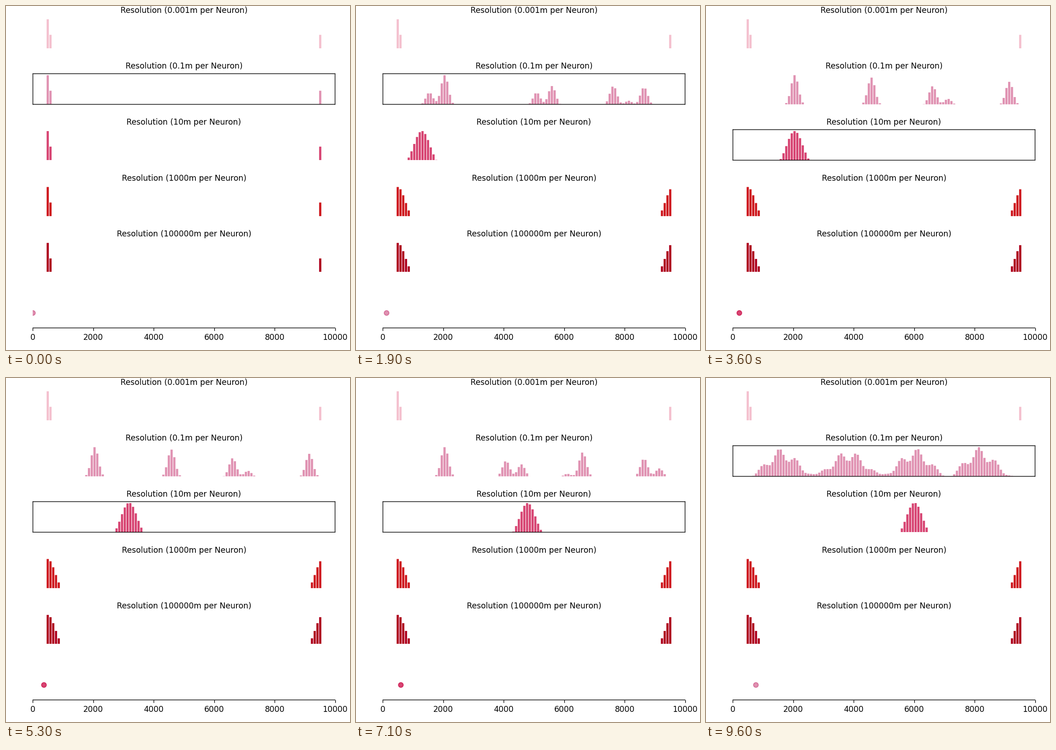
These frames come from a looping animation (748x748 px, 9.7 s). A matplotlib script:

```python
import matplotlib.pyplot as plt
import numpy as np
from matplotlib.animation import FuncAnimation

SIZE, DPI = 748, 125
FRAMES, INTERVAL = 97, 100
STEPS = FRAMES - 1
CELLS = np.arange(100)

# Layout in pixels, measured from the top left
LEFT, RIGHT, LAST_BASE = 58.5, 715.5, 700
ROW_PITCH, ROW_HEIGHT = 121.55, 66.5

SCALES = ["0.001", "0.1", "10", "1000", "100000"]
COLORS = np.array([(244, 192, 206), (224, 146, 178), (215, 68, 114),
                   (206, 24, 30), (174, 0, 30)]) / 255
FINE, MIDDLE = 1, 2
DOT_ALPHA = {FINE: 0.5, MIDDLE: 0.75}

# The selection flips between the 0.1 m and the 10 m network at these steps
SWITCHES = [6, 14, 22, 31, 34, 54, 58, 73, 78, 84, 88, 93]

# Cruise, speed up, sprint, slow down
STEP_KEYS = [0, 35, 52, 70, 95]
DISTANCE_KEYS = [0, 210, 364, 581, 746]
CELLS_PER_METRE = 0.0812

# Copies of the bump in the fine network sit on a regular lattice of cells
SLOTS = np.arange(-2, 16)
SLOT_CELLS = 11.5 + 5.57 * SLOTS


def normalise(values):
    return values / values.max()


def ring_bump(center, spread):
    """Thresholded bell on the ring of cells."""
    gap = np.abs(CELLS - center)
    gap = np.minimum(gap, 100 - gap)
    return normalise(np.maximum(np.exp(-gap ** 2 / spread) - 0.2, 0))


def copies(centers, width=1, fade=0.97):
    """Each center (in slots) feeds the lattice slots that lie near it."""
    weights = sum(fade ** k * np.maximum(1 - np.abs(SLOTS - c) / width, 0)
                  for k, c in enumerate(centers))
    gaps = CELLS[:, None] - SLOT_CELLS
    bells = np.exp(-gaps ** 2 / (3.6 * width))
    return normalise(np.maximum(bells @ weights - 0.03, 0))


def settle(step, values):
    """Ease from the initial pose into the settled activity."""
    amount = min(step / 4, 1)
    return (1 - amount) * START + amount * values


START = np.zeros(100)
START[[0, 1, -1]] = 1, 0.467, 0.467

steps = np.arange(STEPS)
flips = np.searchsorted(SWITCHES, steps, side="right")
active = np.where(flips % 2, MIDDLE, FINE)
distances = np.interp(steps, STEP_KEYS, DISTANCE_KEYS)

# The fine network only advances while it is selected
progress = np.cumsum(active == FINE) - 1
FINE_KEYS = progress[[0, 18, 33, 57, 77, 95]]
FINE_STATES = [
    START,
    copies([0.7, 7.6, 12.2, 14], fade=0.75),
    copies([1, 6, 10.25, 15], fade=0.92),
    copies(1 + 4.44 * np.arange(4)),
    copies(0.65 + 4.45 * np.arange(4), fade=1),
    copies(0.2 + 4.3 * np.arange(4), width=2, fade=1),
]


def fine_activity(step):
    where = np.interp(progress[step], FINE_KEYS, range(len(FINE_KEYS)))
    low = min(int(where), len(FINE_STATES) - 2)
    part = where - low
    return normalise((1 - part) * FINE_STATES[low] + part * FINE_STATES[low + 1])


def middle_activity(step):
    bump = ring_bump(distances[step] * CELLS_PER_METRE, 17.5)
    return normalise(settle(step, bump))


def add_row(index):
    base = LAST_BASE - (5 - index) * ROW_PITCH
    box = np.array([LEFT, SIZE - base, RIGHT - LEFT, ROW_HEIGHT]) / SIZE
    ax = fig.add_axes(box, facecolor="none")
    ax.set_yticks([])
    for spine in ax.spines.values():
        spine.set_snap(False)
    return ax


def show_frame(ax, visible):
    for spine in ax.spines.values():
        spine.set_visible(visible)


plt.rcParams.update({"font.family": "DejaVu Sans", "font.size": 9.9})
fig = plt.figure(figsize=(SIZE / DPI, SIZE / DPI), dpi=DPI, facecolor="white")

rows, bars = [], []
for i, scale in enumerate(SCALES):
    ax = add_row(i)
    ax.set_title(f"Resolution ({scale}m per Neuron)", fontsize=9.9, pad=6.25)
    ax.set_xticks([])
    bars.append(ax.bar(CELLS, START, color=COLORS[i], snap=False))
    ax.set_xlim(-5.39, 104.39)
    ax.set_ylim(0, 1.05)
    rows.append(ax)

track = add_row(5)
track.set_xlim(0, 10000)
track.set_ylim(-1, 1)
track.set_xticks(range(0, 10001, 2000))
show_frame(track, False)
track.spines["bottom"].set_visible(True)
dot = track.scatter([0], [0], s=36, linewidths=1, snap=False)


def paint_dot(row):
    """Translucent fill and edge overlap into a darker ring."""
    alpha = DOT_ALPHA[row]
    base = np.clip((COLORS[row] - (1 - alpha)) / alpha, 0, 1)
    rgba = [(*base, alpha)]
    dot.set_facecolor(rgba)
    dot.set_edgecolor(rgba)


def update(frame):
    step = max(frame - 1, 0)
    coarse = settle(step, ring_bump(0, 15.5))
    levels = [START, fine_activity(step), middle_activity(step), coarse, coarse]
    for i, (ax, group, values) in enumerate(zip(rows, bars, levels)):
        for bar, height in zip(group, values):
            bar.set_height(height)
        show_frame(ax, i == active[step])
    dot.set_offsets([(distances[step], 0)])
    paint_dot(active[step])
    return []


anim = FuncAnimation(fig, update, frames=FRAMES, interval=INTERVAL,
                     repeat=True, repeat_delay=0, blit=False)
plt.show()
```
